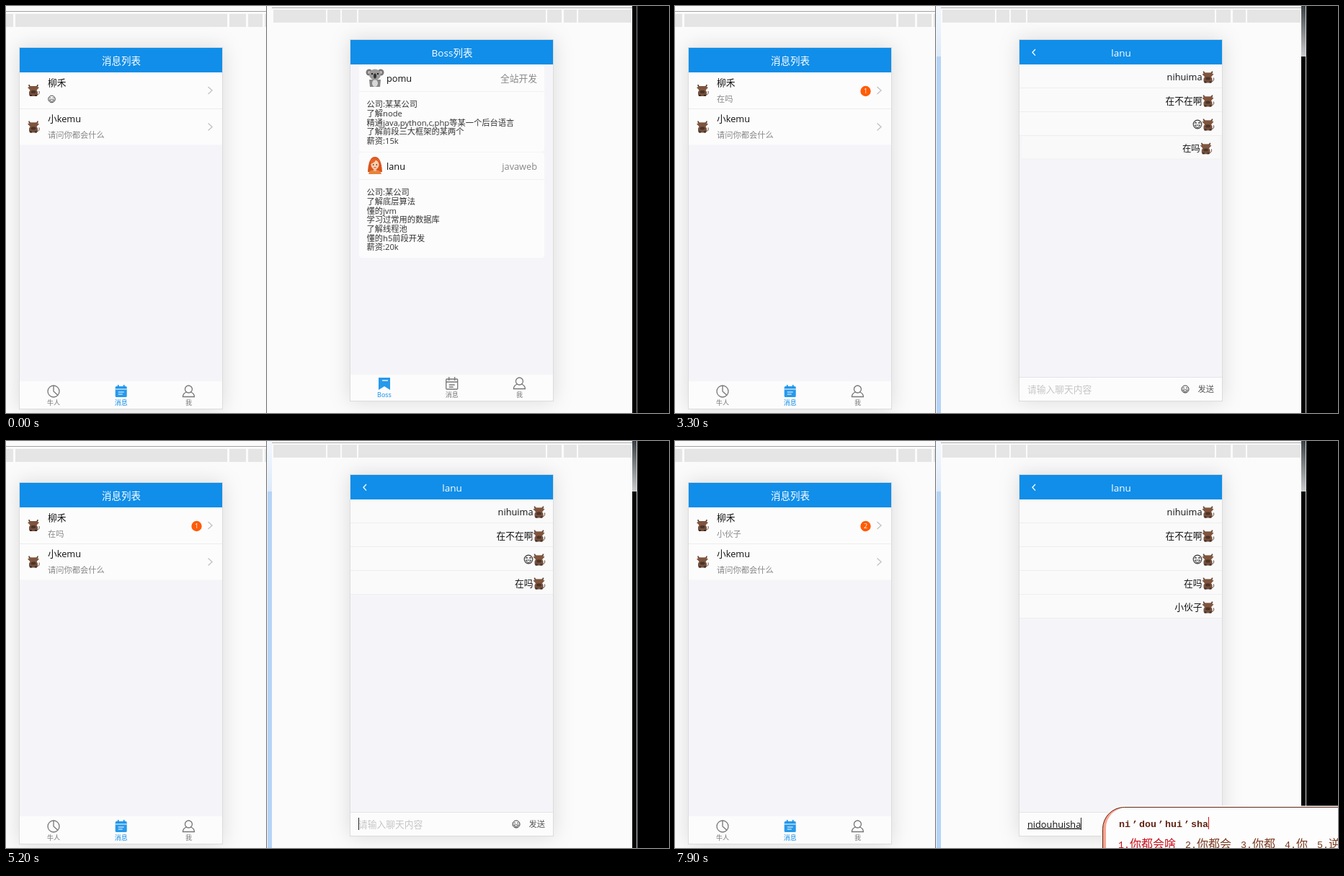
Recreate the animation shown at these times as an HTML page. Size 920 px wide and 564 px high, loop 8000 ms.

```html
<!DOCTYPE html>
<html lang="zh-CN">
<head>
<meta charset="utf-8">
<title>消息列表</title>
<style>
  html, body { margin: 0; width: 100%; height: 100%; overflow: hidden; background: #fbfbfb; }
  svg { display: block; width: 920px; height: 564px; }
  text { font-family: "Open Sans", "Noto Sans CJK SC", "Noto Sans CJK", sans-serif; white-space: pre; }
  .mono { font-family: "Liberation Mono", monospace; font-size: 13.33px; }
  .phone { filter: drop-shadow(0 0 14px rgba(0, 0, 0, .13)); }
  .line { fill: none; stroke: #777; stroke-width: 1.3; }
</style>
</head>
<body>
<svg id="stage" viewBox="0 0 920 564" xmlns="http://www.w3.org/2000/svg"></svg>
<script>
const LOOP = 8000, TICK = 100;
const BLUE = '#108ee9', PANEL = '#fcfcfc', BROWN = '#5f2413';
const $ = id => document.getElementById(id);

const rect = (x, y, w, h, fill, extra = '') =>
  `<rect x="${x}" y="${y}" width="${w}" height="${h}" fill="${fill}" ${extra}/>`;
const text = (x, y, size, str, fill = '#111', extra = '') =>
  `<text x="${x}" y="${y + size * .37}" font-size="${size}" fill="${fill}" ${extra}>${str}</text>`;
const at = (x, y, body, scale = 1) => `<g transform="translate(${x} ${y}) scale(${scale})">${body}</g>`;
const MID = 'text-anchor="middle"', END = 'text-anchor="end"';

const bull = `
  <path d="M5 6Q9 6 8 1" fill="none" stroke="#6d4a38"/>
  <path d="M-6-8Q-6-5-3-5H3Q6-5 6-8" fill="none" stroke="#5b4033" stroke-width="1.6"/>
  <rect x="-6" y="0" width="12" height="8" rx="3" fill="#74503d"/>
  <path d="M-8-4L-4-6H4L8-4 5-1 4 3H-4L-5-1Z" fill="#80543d"/>
  <rect x="-3.5" y="0" width="7" height="4" rx="2" fill="#4c342a"/>
  <path d="M-5 7h3M2 7h3" stroke="#3c2a24" stroke-width="2"/>`;
const koala = `
  <path d="M-8 3H8L7 13H-7Z" fill="#858585"/><ellipse cy="8" rx="4" ry="5" fill="#d8d8d8"/>
  <circle cx="-8" cy="-7" r="4.5" fill="#777"/><circle cx="8" cy="-7" r="4.5" fill="#777"/>
  <circle cx="-8" cy="-7" r="2" fill="#c9b5b5"/><circle cx="8" cy="-7" r="2" fill="#c9b5b5"/>
  <ellipse cy="-4" rx="8" ry="7.5" fill="#999"/><ellipse cy="-2" rx="2" ry="3.4" fill="#333"/>
  <circle cx="-4" cy="-5" r="1.1"/><circle cx="4" cy="-5" r="1.1"/>`;
const girl = `
  <path d="M-10 9Q-9-12 0-12T10 9Z" fill="#d9541e"/>
  <path d="M-9 12Q-8 6 0 6T9 12Z" fill="#e8833a"/><rect x="-2" y="3" width="4" height="5" fill="#f0b48c"/>
  <ellipse cy="-1" rx="5.5" ry="6.5" fill="#fbd0ae"/><path d="M-6-2Q0-4 2-9 5-6 6-2V-8Q0-12-6-8Z" fill="#e8632a"/>
  <circle cx="-2.3" cy="-1" r=".8"/><circle cx="2.3" cy="-1" r=".8"/>
  <path d="M-1.5 2.5Q0 3.5 1.5 2.5" fill="none" stroke="#c33"/>`;
const smile = `
  <circle r="5.3" fill="none" stroke="#333"/><path d="M-3.5 1H3.5Q2.5 4 0 4T-3.5 1Z" fill="#fff" stroke="#333" stroke-width=".9"/>
  <path d="M-3.6-1.2l1.3-1.2 1.3 1.2M1-1.2l1.3-1.2 1.3 1.2" fill="none" stroke="#333"/>`;
const pie = `<g class="line"><circle r="8"/><path d="M0-8V0L6 5.5"/></g>`;
const person = `<g class="line"><circle cy="-3" r="5"/><path d="M-3 1Q-8 3-8 7.5H8Q8 3 3 1"/></g>`;
const notes = `<g class="line"><rect x="-8" y="-6" width="16" height="14" rx="1"/>
  <path d="M-8-2H8M-4-9V-4M4-9V-4M-4 2H4M-4 5H2"/></g>`;
const notesOn = `<rect x="-8" y="-7" width="16" height="15" rx="1.5" fill="${BLUE}" opacity=".9"/>
  <path d="M-4-9V-5M4-9V-5" stroke="${BLUE}" stroke-width="1.6"/>
  <path d="M-8-3H8M-4 1H4M-4 4H2" stroke="#fff" stroke-width="1.2"/>`;
const flag = `<path d="M-8-8H8V9L0 4-8 9Z" fill="${BLUE}" opacity=".9"/><path d="M-3-4H5" stroke="#fff" stroke-width="1.3"/>`;
const arrow = y => `<path d="M280.5 ${y - 5}l5.5 5-5.5 5" fill="none" stroke="#c4c4c8" stroke-width="1.4"/>`;

const tabs = (x, y, items) => items.map(([icon, label, on], i) =>
  at(x + 93.7 * i, y, icon) + text(x + 93.7 * i, y + 16, 9, label, on ? BLUE : '#777', MID)).join('');

const ruler = (y, spans) => spans.map(([a, b]) => rect(a, y, b - a, 18, '#e5e5e5')).join('');

const frame = (x, y, title) => `<g class="phone">${rect(x + .5, y + .5, 282, 501, '#f5f5f9', 'stroke="#dcdcdc"')}</g>` +
  rect(x + 1, y + 1, 281, 34, BLUE) + title;

const contact = (y, name, sub) => rect(19, y, 281, 50, PANEL) + at(38, y + 25, bull) +
  text(58, y + 14, 12.75, name) + sub + arrow(y + 25);

const card = (y, h, icon, name, job, lines) =>
  rect(490, y, 257, h, PANEL, 'rx="4"') + rect(490, y + 37, 257, 1, '#f1f1f3') +
  at(512, y + 18, icon) + text(528, y + 19, 12.75, name) + text(737, y + 19, 12.75, job, '#888', END) +
  lines.map((s, i) => text(500.5, y + 55 + 12.7 * i, 11.25, s, '#333')).join('');

// Each message scales in from its centre.
const messages = [
  ['nihuima', 620], ['在不在啊', 720], ['', 820], ['在吗', 2955], ['小伙子', 5865],
].map(([str, start], i) => ({ str, start, y: 81 + 33 * i }));

const row = ({ str, y }, i) => `<g id="row${i}">` + rect(478, y, 281, 33, '#fafafa') +
  rect(478, y + 32, 281, 1, '#eeeef0') + at(739.5, y + 17.5, bull) +
  (str ? text(731.5, y + 17, 12.75, str, '#111', END) : at(725, y + 17, smile, 1.1)) + '</g>';

$('stage').innerHTML = `
  <defs>
    <linearGradient id="edgeL" x2="0" y2="1"><stop stop-color="#f4f8fd"/><stop offset="1" stop-color="#dbe9fa"/></linearGradient>
    <linearGradient id="edgeR" x2="0" y2="1"><stop stop-color="#3c4146"/><stop offset="1" stop-color="#c9cbcd"/></linearGradient>
  </defs>
  ${rect(0, 0, 920, 564, '#fbfbfb')}
  ${rect(0, 7, 361, 1, '#a2a2a2')}
  ${ruler(11, [[0, 10], [13, 307], [310, 333], [336, 356], [359, 361]])}
  ${rect(369, 2, 500, 1, '#a8a8a8')}
  ${ruler(5, [[371, 444], [446, 464], [466, 487], [489, 749], [751, 771], [774, 792], [794, 868]])}
  ${rect(361, 0, 1, 564, '#6a6a6a')}
  ${rect(869, 0, 51, 564, '#000')}${rect(875, 0, 1, 564, '#8b8f92')}
  <g id="active">
    ${rect(363, 0, 6, 70, 'url(#edgeL)')}${rect(363, 70, 6, 494, '#b4d3f6')}
    ${rect(869, 0, 6, 70, 'url(#edgeR)')}${rect(875, 0, 1, 564, '#d5d8da')}
  </g>

  ${frame(18, 57, text(160, 76, 13.5, '消息列表', '#fff', MID + ' font-weight="500"'))}
  ${contact(92, '柳禾', `<g id="face">${at(63.5, 129, smile, .9)}</g>` + text(58, 129, 11.25, '', '#888', 'id="last"'))}
  ${contact(142.5, '小kemu', text(58, 179, 11.25, '请问你都会什么', '#888'))}
  ${rect(19, 142, 281, 1, '#ececef')}
  <g id="badge"><circle cx="264.5" cy="118" r="7.2" fill="#ff5b05"/>${text(264.5, 118, 9, '', '#fff', MID + ' id="count"')}</g>
  ${rect(19, 520, 281, 38, PANEL)}
  ${tabs(66, 534, [[pie, '牛人'], [notesOn, '消息', 1], [person, '我']])}

  ${frame(477, 46, '')}
  <g id="list">
    ${text(619, 65, 13.5, 'Boss列表', '#fff', MID + ' font-weight="500"')}
    ${card(81, 121, koala, 'pomu', '全站开发',
      ['公司:某某公司', '了解node', '精通java,python,c,php等某一个后台语言', '了解前段三大框架的某两个', '薪资:15k'])}
    ${card(203, 146, girl, 'lanu', 'javaweb',
      ['公司:某公司', '了解底层算法', '懂的jvm', '学习过常用的数据库', '了解线程池', '懂的h5前段开发', '薪资:20k'])}
    ${rect(478, 511, 281, 36, PANEL)}
    ${tabs(525, 523, [[flag, 'Boss', 1], [notes, '消息'], [person, '我']])}
  </g>
  <g id="chat">
    ${text(619, 65, 13.5, 'lanu', '#fff', MID + ' font-weight="500"')}
    <path d="M500 60l-4 4.3 4 4.3" fill="none" stroke="#fff" stroke-width="1.3"/>
    ${messages.map(row).join('')}
    ${rect(478, 515, 281, 32, PANEL)}${rect(478, 514, 281, 1, '#e4e4e8')}
    ${text(489, 531, 12.75, '请输入聊天内容', '#c6c6c6', 'id="hint"')}
    ${text(489, 531, 12.75, '', '#111', 'id="input"')}
    ${at(708, 531, smile, .95)}${text(748, 531, 11.25, '发送', '#555', END)}
    ${rect(489, 522, 1, 17, '#222', 'id="caret"')}
  </g>
  <g id="ime"></g>`;

// [time, committed text, pinyin, candidates]
const steps = [
  [1400, ''],
  [2200, '', 'z', '在 中 值 做 这'],
  [2300, '', 'za', '咋 杂 砸 扎 匝'],
  [2400, '', 'zai', '在 再 载 灾 仔'],
  [2500, '', "zai'ma", '在吗 在嘛 再 在 载'],
  [2600, '在吗'],
  [2800, ''],
  [3500, '', 'x', '想 下 小 需 像'],
  [3600, '', 'xi', '系 洗 西 喜 细'],
  [3700, '', 'xia', '下 夏 吓 侠 瞎'],
  [3800, '', 'xian', '先 现 线 县 小'],
  [3900, '', "xian'h", '小号 笑话 小孩 消耗 小河'],
  [4000, '', "xian'hu", '小户 小湖 小胡 小虎 小狐'],
  [4100, '', "xian'huo", '小伙 销货 小火 小活 小货'],
  [4400, '', "xian'huo'z", '小伙子 小伙 销货 小火 小活'],
  [4600, '', "xian'huo'zi", '小伙子 小伙 销货 小火 小活'],
  [4700, '小伙子'],
  [5200, ''],
  [6800, '', 'n', '你 呢 能 年 男'],
  [6900, '', 'ni', '你 呢 尼 泥 拟'],
  [7100, '', "ni'd", '你的 你 呢 尼 泥'],
  [7200, '', "ni'do", '你都 你 呢 尼 泥'],
  [7300, '', "ni'dou", '你都 你 逆 呢 尼'],
  [7500, '', "ni'dou'h", '你都会 你都 你 逆 呢'],
  [7600, '', "ni'dou'hu", '你都会 你都 你 逆 呢'],
  [7700, '', "ni'dou'hui", '你都会 你都 你 逆 呢'],
  [7800, '', "ni'dou'hui'sh", '你都会是 你都会 你都 你 逆'],
  [7900, '', "ni'dou'hui'sha", '你都会啥 你都会 你都 你 逆'],
];

function ime(x, pinyin, words) {
  const left = x - 22;
  let cx = x, items = '';
  words.split(' ').forEach((w, i) => {
    items += text(cx, 558, 16, `<tspan class="mono">${i + 1}.</tspan>${w}`, i ? '#7a3a20' : '#c8101c');
    cx += 29 + 16 * w.length;
  });
  const right = cx + 143, parts = pinyin.split("'");
  const caret = x + 1 + 8 * parts.join('').length + 12 * (parts.length - 1);
  let px = x + 1;
  const keys = parts.map((p, i) => {
    const out = (i ? text(px - 10, 530, 13.33, '’', BROWN, 'class="mono" font-weight="700"') : '') +
      text(px, 530, 13.33, p, BROWN, 'class="mono" font-weight="700"');
    px += 8 * p.length + 12;
    return out;
  }).join('');
  return rect(left + .5, 507.5, right - left, 90, '#f7a391', 'rx="30" stroke="#fff" stroke-width="4"') +
    rect(left + .5, 507.5, right - left, 90, '#f7a391', `rx="30" stroke="${BROWN}"`) +
    rect(left + 5, 508, right - left - 9, 90, '#fdfdfd', 'rx="28"') +
    `<ellipse cx="${cx + 98}" cy="547" rx="38" ry="30" fill="#fffaf6" stroke="${BROWN}" stroke-width="1.4"/>` +
    keys + rect(caret, 521, 1, 17, '#d01018') + items +
    `<path d="M${cx + 6} 553v11l-6-5.5z" fill="#c9b8ae"/><path d="M${cx + 12} 553v11l6.5-5.5z" fill="${BROWN}"/>`;
}

const ease = p => p < .5 ? 8 * p ** 4 : 1 - 8 * (1 - p) ** 4;
const show = (id, on) => $(id).style.display = on ? '' : 'none';

function draw(t) {
  const open = t >= 600, unread = t >= 5900 ? 2 : t >= 3000 ? 1 : 0;
  show('active', open);
  show('list', !open);
  show('chat', open);

  show('face', !unread);
  show('badge', unread);
  $('last').textContent = ['', '在吗', '小伙子'][unread];
  $('count').textContent = unread || '';

  messages.forEach(({ start, y }, i) => {
    const s = ease(Math.min(1, Math.max(0, (t - start) / 450))), cy = y + 16.5;
    show('row' + i, s > 0);
    $('row' + i).setAttribute('transform', `translate(619 ${cy}) scale(${s}) translate(-619 ${-cy})`);
    $('row' + i).setAttribute('opacity', s);
  });

  const step = steps.filter(s => s[0] <= t).pop();
  const [since, done, pinyin, words] = step || [0, ''];
  const typed = pinyin ? pinyin.replaceAll("'", '') : done, input = $('input');
  input.textContent = typed;
  input.setAttribute('text-decoration', pinyin ? 'underline' : 'none');
  show('hint', !typed);
  const width = typed && open ? input.getComputedTextLength() : 0;
  $('caret').setAttribute('x', Math.round(489 + width));
  show('caret', step && (typed || (t - since) % 900 < 450));
  $('ime').innerHTML = pinyin ? ime(Math.round(515.7 + width * 4 / 3), pinyin, words) : '';
}

let last = -1;
function loop() {
  const t = Math.floor(performance.now() % LOOP / TICK) * TICK;
  if (t !== last) draw(last = t);
  requestAnimationFrame(loop);
}
loop();
</script>
</body>
</html>
```
